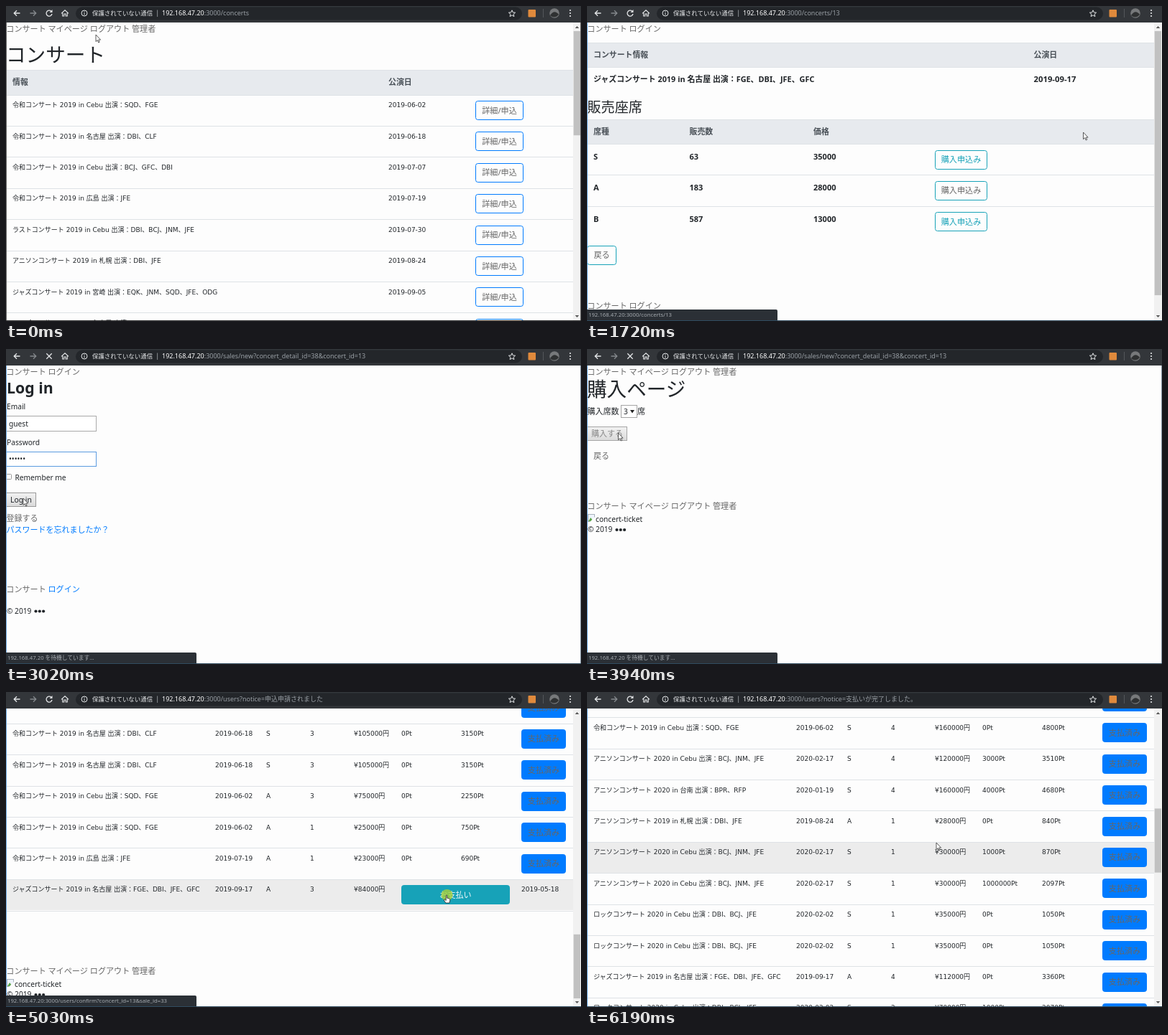
Recreate the animation shown at these times as an HTML page. Size 800 by 439 pixels, loop 6.31 s.

```html
<!DOCTYPE html>
<html lang="ja">
<head>
<meta charset="utf-8">
<title>コンサート</title>
<style>
  html, body { margin: 0; width: 100%; height: 100%; overflow: hidden; background: #fdfdfd; }
  svg { display: block; width: 100vw; height: 100vh; }
  text { font-family: 'Noto Sans', 'Noto Sans CJK JP', sans-serif; white-space: pre; }
  .td { font-family: 'DejaVu Sans', 'Noto Sans CJK JP', sans-serif; }
  .b { font-weight: 700; }
  .mid { text-anchor: middle; }
</style>
</head>
<body>
<svg id="stage" viewBox="0 0 800 439"></svg>
<script>
const LOOP = 6310, ROW = 43.4, TOP = 23, VIEW = 415;
const LIST_END = 705, USERS_END = 1409;
const INK = '#212529', GREY = '#666', BLUE = '#007bff', TEAL = '#17a2b8', HEAD = '#e7eaee', LINE = '#dee2e6';
const HOST = '192.168.47.20';

// ---- drawing helpers (y of a text is its middle) ----
const text = (x, y, s, size = 11, fill = INK, cls = '') =>
  `<text x="${x}" y="${(y + size * 0.36).toFixed(2)}" font-size="${size}" fill="${fill}" class="${cls}">${s}</text>`;
const box = (x, y, w, h, fill, stroke = 'none', r = 0) => {
  const o = stroke === 'none' ? 0 : 0.5;
  return `<rect x="${x + o}" y="${y + o}" width="${w - 2 * o}" height="${h - 2 * o}" rx="${r}" fill="${fill}" stroke="${stroke}"/>`;
};
const stroke = (d, color, w = 1.3) =>
  `<path d="${d}" fill="none" stroke="${color}" stroke-width="${w}"/>`;
const rule = y => box(0, Math.round(y), 789, 1, LINE);
const cell = (x, y, s) => text(x, y, s, 9, INK, 'td');
const latin = (x, y, s) => text(x, y, s, 10.2);
const title = (y, s) => text(0, y, s, 27.6);
const button = (x, cy, w, label, edge, ink, fill = 'none') =>
  box(x, Math.round(cy - 13.5), w, 27, fill, edge, 3) + text(x + w / 2, cy, label, 11.1, ink, 'mid');
const plainButton = (y, w, label, ink) =>
  box(0, y, w, 20, 'url(#grey)', '#a6a6a6') + text(w / 2, y + 10.5, label, 11, ink, 'mid');
const header = (y, cols) => box(0, y, 789, 35, HEAD) + rule(y) +
  cols.map(([x, s]) => text(x, y + 17, s, 10.9, '#495057', 'b')).join('');

const nav = (y, inside, loginInk = GREY) =>
  text(0.3, y, 'コンサート', 11.1, GREY) + (inside
    ? text(58.5, y, 'マイページ', 11.1, GREY) + text(116.8, y, 'ログアウト', 11.1, GREY) + text(175, y, '管理者', 11.1, GREY)
    : text(58.5, y, 'ログイン', 11.1, loginInk));
const copyright = y => latin(1, y, '© 2019 ') +
  [41.5, 46.8, 52.1].map(x => `<circle cx="${x}" cy="${y + 0.5}" r="2.1" fill="${INK}"/>`).join('');
const footer = (y, inside) => nav(y, inside) +
  `<g transform="translate(1,${y + 11})">` + box(0, 0, 10, 11, '#eef4fb', '#a9b2bd') +
  '<path d="M1 10L4 5L8 10Z" fill="#5aa646"/><path d="M10 4L3 11H10Z" fill="#fdfdfd"/></g>' +
  latin(12, y + 18.5, 'concert-ticket') + copyright(y + 32.5);

// ---- data ----
const concerts = `令和|Cebu|SQD、FGE|2019-06-02
令和|名古屋|DBI、CLF|2019-06-18
令和|Cebu|BCJ、GFC、DBI|2019-07-07
令和|広島|JFE|2019-07-19
ラスト|Cebu|DBI、BCJ、JNM、JFE|2019-07-30
アニソン|札幌|DBI、JFE|2019-08-24
ジャズ|宮崎|EQK、JNM、SQD、JFE、ODG|2019-09-05
ジャズ|名古屋|FGE、DBI、JFE、GFC|2019-09-17
雅楽|札幌|RFP、CLF|2019-10-11
ロック|広島|JNM、ODG|2019-11-03
ラスト|宮崎|BCJ、EQK|2019-11-24
令和|台南|SQD、NQN|2019-12-15
アニソン|台南|BPR、RFP|2020-01-19
ジャズ|Cebu|BCJ、SQD|2020-01-26
ロック|Cebu|DBI、BCJ、JFE|2020-02-02
雅楽|広島|BCJ、DBI、QGE|2020-02-06
ロック|札幌|ODG|2020-02-12
アニソン|Cebu|BCJ、JNM、JFE|2020-02-17
ジャズ|宮崎|EQK、BCJ、RFP、JFE|2020-03-15
ジャズ|広島|BCJ、NQN|2020-03-22`.split('\n').map(line => {
  const [kind, place, acts, date] = line.split('|');
  return { date, title: `${kind}コンサート ${date.slice(0, 4)} in ${place} 出演：${acts}` };
});

let seed = 7;
const pick = n => (seed = (seed * 16807) % 2147483647) % n;
const filler = n => Array.from({ length: n }, () => {
  const seats = 1 + pick(4), a = pick(2);
  return [pick(20), a ? 'A' : 'S', seats, seats * (a ? 28000 : 35000), 0];
});
// concert, seat, count, price, points used, points earned
const sales = [
  ...filler(9),
  [0, 'S', 4, 160000, 0], [17, 'S', 4, 120000, 3000], [12, 'S', 4, 160000, 4000],
  [5, 'A', 1, 28000, 0], [17, 'S', 1, 30000, 1000], [17, 'S', 1, 30000, 1000000, 2097],
  [14, 'S', 1, 35000, 0], [14, 'S', 1, 35000, 0], [7, 'A', 4, 112000, 0],
  [14, 'S', 2, 70000, 1000],
  ...filler(9),
  [1, 'S', 3, 105000, 0], [1, 'S', 3, 105000, 0], [0, 'A', 3, 75000, 0],
  [0, 'A', 1, 25000, 0], [3, 'A', 1, 23000, 0], [7, 'A', 3, 84000, 0]
];

// ---- pages ----
const listPage = inside => ({
  height: LIST_END + VIEW, rowTop: 124, rows: concerts.length,
  svg: nav(31.5, inside) + title(68, 'コンサート') + header(89, [[9, '情報'], [532, '公演日']]) +
    concerts.map((c, i) => {
      const y = 124 + ROW * i;
      return rule(y - 0.5) + cell(9, y + 14, c.title) + cell(532, y + 14, c.date) +
        button(653, y + 21.5, 67, '詳細/申込', BLUE, GREY);
    }).join('') + footer(LIST_END + 389, inside)
});

const detailPage = (inside, name, cols, rows, label, foot) => ({
  height: foot ? 442 : 0,
  svg: nav(31.5, inside) + header(51, [[9, 'コンサート情報'], [621.5, '公演日']]) + rule(85) +
    text(9, 102, concerts[7].title, 10.9, INK, 'b') + text(621.5, 102, concerts[7].date, 11.3, INK, 'b') +
    text(0.5, 141, name, 19.1) + header(158, cols) +
    rows.map((r, i) => {
      const y = 192 + ROW * i;
      return rule(y) + [9, 142.5, 315].map((x, k) => text(x, y + 18, r[k], 11, INK, 'b')).join('') +
        button(484, y + 22, 73, label, TEAL, r[0] === 'A' ? GREY : TEAL);
    }).join('') +
    button(0, 217 + ROW * rows.length, 41, '戻る', TEAL, GREY) +
    footer(287.8 + ROW * rows.length, inside)
});

const loginPage = (mail, pass, focus) => ({
  height: 0,
  svg: nav(31.5, false) + text(1, 54, 'Log in', 21.3, INK, 'b') +
    latin(1, 80, 'Email') + box(0, 93, 126, 22, '#fff', focus ? '#a9a9a9' : '#5b9be0') +
    latin(4, 104, mail) + (focus || mail ? '' : box(2, 96, 1, 15, '#222')) +
    latin(1, 130, 'Password') + box(0, 143, 126, 21, '#fff', focus ? '#5b9be0' : '#a9a9b0') + latin(4, 153.5, pass) +
    box(0, 174, 8, 8, '#fff', '#999', 1) + latin(12.5, 179.5, 'Remember me') +
    box(0, 200, 42, 20, 'url(#grey)', '#999') + text(21, 210, 'Log in', 10.4, INK, 'mid') +
    text(0.5, 236, '登録する', 11, GREY) + text(0.5, 252, 'パスワードを忘れましたか？', 11, BLUE) +
    nav(334.5, false, BLUE) + copyright(365)
});

const buyPage = (count, open, sent) => ({
  height: 0,
  svg: nav(31.5, true) + title(56, '購入ページ') + text(0.5, 87, '購入席数', 11) +
    text(70, 87, '席', 11) + plainButton(108, 56, '購入する', sent ? '#888' : INK) +
    text(9, 149, '戻る', 11, GREY) + footer(219, true) +
    box(47, 78, 23, 18, '#fff', '#a5a5a5') + latin(51, 87.5, count) +
    '<path d="M60 85H66L63 89.5Z" fill="#222"/>' +
    (open ? box(47, 96, 23, 63, '#fff', '#888') + [1, 2, 3, 4].map((n, i) => {
      const y = 97 + i * 15.2;
      return (n === count ? box(48, y, 21, 15.2, '#1e90ff') : '') +
        text(51, y + 7.8, n, 10.2, n === count ? '#fff' : INK);
    }).join('') : '')
});

const usersPage = paid => ({
  height: USERS_END + VIEW, rowTop: 238, rows: sales.length,
  svg: nav(31.5, true) + title(68, 'マイページ') +
    header(89, [[9, 'ユーザー'], [532, 'ポイント']]) + rule(124) + cell(9, 138, 'guest') + cell(532, 138, '12000Pt') +
    text(0.5, 185, '購入履歴', 19.1) +
    header(203, [[9, '情報'], [291, '公演日'], [362, '席種'], [423, '枚数'], [484, '価格'], [550, '使用Pt'], [633, '獲得Pt'], [717, '状態']]) +
    sales.map(([id, seat, n, price, used, earned], i) => {
      const y = 238 + ROW * i, m = y + 14, c = concerts[id];
      const due = !paid && i === sales.length - 1;
      return rule(y - 0.5) + cell(9, m, c.title) + cell(291, m, c.date) + cell(362, m, seat) + cell(423, m, n) +
        cell(484, m, `¥${price}円`) + (due
          ? button(550, y + 21.5, 151, 'お支払い', TEAL, '#f4fafb', TEAL) + cell(717, m, '2019-05-18')
          : cell(550, m, used + 'Pt') + cell(633, m, (earned || (price - used) * 0.03).toFixed(0) + 'Pt') +
            button(717, y + 21.2, 62, '支払済み', BLUE, GREY, BLUE));
    }).join('') + rule(238 + ROW * sales.length) + footer(USERS_END + 389, true)
});

const seatCols = [[9, '席種'], [142.5, '販売数'], [315, '価格']];
const SALE = '/sales/new?concert_detail_id=38&concert_id=13';
const CONFIRM = '/users/confirm?concert_id=13&sale_id=33';
const pages = {
  list: { ...listPage(true), path: '/concerts' },
  home: { ...listPage(false), path: '' },
  detail: { ...detailPage(false, '販売座席', seatCols,
    [['S', 63, 35000], ['A', 183, 28000], ['B', 587, 13000]], '購入申込み', true), path: '/concerts/13' },
  login: { ...loginPage('', '', false), path: SALE },
  loginMail: { ...loginPage('guest', '', false), path: SALE },
  loginFull: { ...loginPage('guest', '••••••', true), path: SALE },
  buy: { ...buyPage(1), path: SALE },
  buyOpen: { ...buyPage(1, true), path: SALE },
  buyPick: { ...buyPage(3, true), path: SALE },
  buyThree: { ...buyPage(3), path: SALE },
  buySent: { ...buyPage(3, false, true), path: SALE },
  users: { ...usersPage(false), path: '/users?notice=申込申請されました' },
  confirm: { ...detailPage(true, '支払い確認', [[9, '席種'], [142.5, '枚数'], [315, '価格']],
    [['A', 3, 84000]], 'お支払い', false), path: CONFIRM },
  paid: { ...usersPage(true), path: '/users?notice=支払いが完了しました。' }
};

// ---- story: start, page, cursor [x0,y0,x1,y1], then optional steps, step length, scroll and flags ----
const url = path => `${HOST}:3000${path}`;
const WAIT = { load: true, status: `${HOST} を待機しています...` };
const step = (t, page, cursor, more = {}) => ({ t, page, cursor, n: 1, dt: 108, scroll: [0, 0], ...more });
const story = [
  step(0, 'list', [125, 40]),
  step(100, 'home', [132, 46]),
  step(240, 'home', [160, 52, 302, 76], { n: 6, dt: 106, scroll: [100, LIST_END] }),
  step(1000, 'home', [330, 84, 680, 170], { n: 5, dt: 98, scroll: [640, 273] }),
  step(1490, 'home', [690.5, 176], { scroll: [273, 273], status: url('/concerts/13') }),
  step(1720, 'detail', [690.5, 176], { status: url('/concerts/13') }),
  step(1830, 'detail', [660, 198, 560, 245], { n: 3 }),
  step(2150, 'detail', [518, 257], { status: url(SALE) }),
  step(2260, 'login', [360, 270], { status: url(SALE) }),
  step(2380, 'login', [190, 180]),
  step(2480, 'loginMail', [92, 108]),
  step(2690, 'loginFull', [60, 160, 24, 208], { n: 2 }),
  step(2920, 'loginFull', [24, 208], WAIT),
  step(3040, 'buy', [30, 180, 58, 88], { n: 3, dt: 115 }),
  step(3390, 'buyOpen', [58, 88]),
  step(3480, 'buyPick', [58, 134]),
  step(3580, 'buyThree', [58, 134]),
  step(3720, 'buyThree', [54, 128, 43.5, 117], { n: 2 }),
  step(3940, 'buySent', [43.5, 117], WAIT),
  step(4060, 'users', [80, 130, 330, 210], { n: 3, dt: 105 }),
  step(4390, 'users', [400, 230, 611, 286], { n: 6, dt: 110, scroll: [200, USERS_END] }),
  step(5030, 'users', [613, 283], { scroll: [USERS_END, USERS_END], hand: true, click: true, status: url(CONFIRM) }),
  step(5140, 'users', [613, 283], { scroll: [USERS_END, USERS_END], hand: true, load: true, status: url(CONFIRM) }),
  step(5240, 'confirm', [600, 270, 525, 216], { n: 3, dt: 105 }),
  step(5560, 'confirm', [521, 214], WAIT),
  step(5660, 'paid', [516, 213]),
  step(5790, 'paid', [510, 213, 486, 210], { n: 5, dt: 100, scroll: [119, 593] })
];

// ---- browser frame ----
const PALE = '#e4e6e8';
const bar = box(0, 0, 800, 23, '#33363a') + box(97, 1.5, 621, 18, '#23262a', 'none', 9) +
  stroke('M19.5 10H11.5M15 6.2L11.2 10L15 13.8', PALE) +
  stroke('M33.5 10H41.5M38 6.2L41.8 10L38 13.8', '#85898d') +
  `<g id="reload">${stroke('M63 7.4A4 4 0 1 0 64 11', PALE)}<path d="M64.5 5V9H60.5Z" fill="${PALE}"/></g>` +
  `<g id="stop">${stroke('M56.3 6.3L63.7 13.7M63.7 6.3L56.3 13.7', PALE)}</g>` +
  stroke('M77 10.3L82 5.8L87 10.3M78.7 9.5V14H80.8V11H83.2V14H85.3V9.5', PALE, 1.1) +
  `<circle cx="109" cy="10" r="4" fill="none" stroke="${PALE}"/>` + box(108.5, 9.4, 1, 3, PALE) + box(108.5, 7.4, 1, 1.1, PALE) +
  text(120, 10, '保護されていない通信', 8.45, PALE) + box(210.3, 5.5, 0.8, 9.5, '#a0a4a8') +
  `<text x="217" y="13.3" font-size="9" fill="#fff">${HOST}<tspan id="path" fill="#9aa0a6"></tspan></text>` +
  '<path id="star" stroke-width="1" d="M704 5.8L705.3 8.9L708.6 9.2L706.1 11.4L706.9 14.6L704 12.9L701.1 14.6L701.9 11.4L699.4 9.2L702.7 8.9Z"/>' +
  box(726.5, 5, 10.5, 10.5, '#e08a3c', 'none', 1) + box(747, 4, 0.8, 12, '#5c6064') +
  '<circle cx="763" cy="10" r="6.8" fill="#77797b"/><path d="M757 13Q763 4 769 12Q764 18 758 14Z" fill="#2f3132"/>' +
  [6, 10, 14].map(y => `<circle cx="785" cy="${y}" r="1.1" fill="${PALE}"/>`).join('');

const defs = '<defs><linearGradient id="grey" x2="0" y2="1"><stop stop-color="#f2f2f2"/><stop offset="1" stop-color="#dadada"/></linearGradient></defs>';
const scrollbar = '<g id="bar">' + box(789, 23, 11, 415, '#f1f1f1') +
  '<path d="M791.8 31L794.5 28L797.2 31Z" fill="#555"/><path d="M791.8 431L794.5 434L797.2 431Z" fill="#555"/>' +
  '<rect id="thumb" x="789.7" width="9.3" fill="#c1c1c1"/></g>';
const status = '<g id="status"><path d="M0 423H263Q265 423 265 425V438H0Z" fill="#2b3036"/>' +
  '<text id="note" x="2" y="433.3" font-size="7.75" fill="#a6abb0"></text></g>';
const pointer = '<g id="pointer"><circle id="ring" cx="0.5" cy="0" r="8" fill="#a9cf3a" opacity=".8"/>' +
  '<path id="arrow" d="M0 0V9.6L2.2 7.6L3.7 11L5.2 10.3L3.7 7.1H6.6Z" fill="#fff" stroke="#333" stroke-width=".8"/>' +
  '<path id="hand" d="M-.8 .6Q0 -.6 .8 .6V4.2L4 5Q5 5.4 4.8 7L4 11H-1.2L-3.8 7Q-3.6 5.8 -2.4 6.3L-.8 7.6Z" fill="#fff" stroke="#222" stroke-width=".8"/></g>';

document.getElementById('stage').innerHTML = defs + box(0, 0, 800, 439, '#fdfdfd') +
  '<g id="scroller"><rect id="hover" width="789" height="43" fill="#ececec"/>' +
  Object.entries(pages).map(([k, p]) => `<g id="p-${k}">${p.svg}</g>`).join('') + '</g>' +
  scrollbar + bar + '<rect id="edge" y="23" width="1" height="416"/><rect id="side" x="799" y="23" width="1" height="416"/>' +
  '<rect id="base" y="438" width="800" height="1"/>' + status + pointer;

const $ = id => document.getElementById(id);
const show = (id, on) => $(id).setAttribute('display', on ? 'inline' : 'none');
const set = (id, attrs) => { for (const k in attrs) $(id).setAttribute(k, attrs[k]); };

function draw(t) {
  const s = story.filter(e => e.t <= t).pop();
  const k = Math.min(s.n - 1, Math.floor((t - s.t) / s.dt));
  const mix = (a, b) => s.n > 1 ? a + (b - a) * k / (s.n - 1) : a;
  const [x0, y0, x1 = x0, y1 = y0] = s.cursor;
  const x = mix(x0, x1), y = mix(y0, y1), top = Math.round(mix(...s.scroll)), page = pages[s.page];

  for (const name in pages) show('p-' + name, name === s.page);
  set('scroller', { transform: `translate(0,${-top})` });
  const row = Math.floor((y + top - page.rowTop) / ROW);
  show('hover', row >= 0 && row < page.rows);
  if (page.rows) set('hover', { y: Math.round(page.rowTop + row * ROW) });

  show('bar', page.height);
  if (page.height) set('thumb', { y: TOP + 12 + 392 * top / page.height, height: 392 * VIEW / page.height });
  $('path').textContent = ':3000' + page.path;
  const marked = s.page === 'home';
  set('star', { fill: marked ? '#7fa9dc' : 'none', stroke: marked ? '#7fa9dc' : PALE });
  show('reload', !s.load);
  show('stop', s.load);
  show('status', s.status);
  $('note').textContent = s.status || '';

  const first = s.page === 'list';
  set('edge', { fill: first ? '#666' : '#6fa8e0' });
  set('base', { fill: first ? '#333' : '#2f4a5e' });
  set('side', { fill: first ? '#666' : '#8494a3' });
  show('side', first || !page.height);
  set('pointer', { transform: `translate(${x},${y})` });
  show('arrow', !s.hand);
  show('hand', s.hand);
  show('ring', s.click);
}

function tick() {
  draw(performance.now() % LOOP);
  requestAnimationFrame(tick);
}
tick();
</script>
</body>
</html>
```
